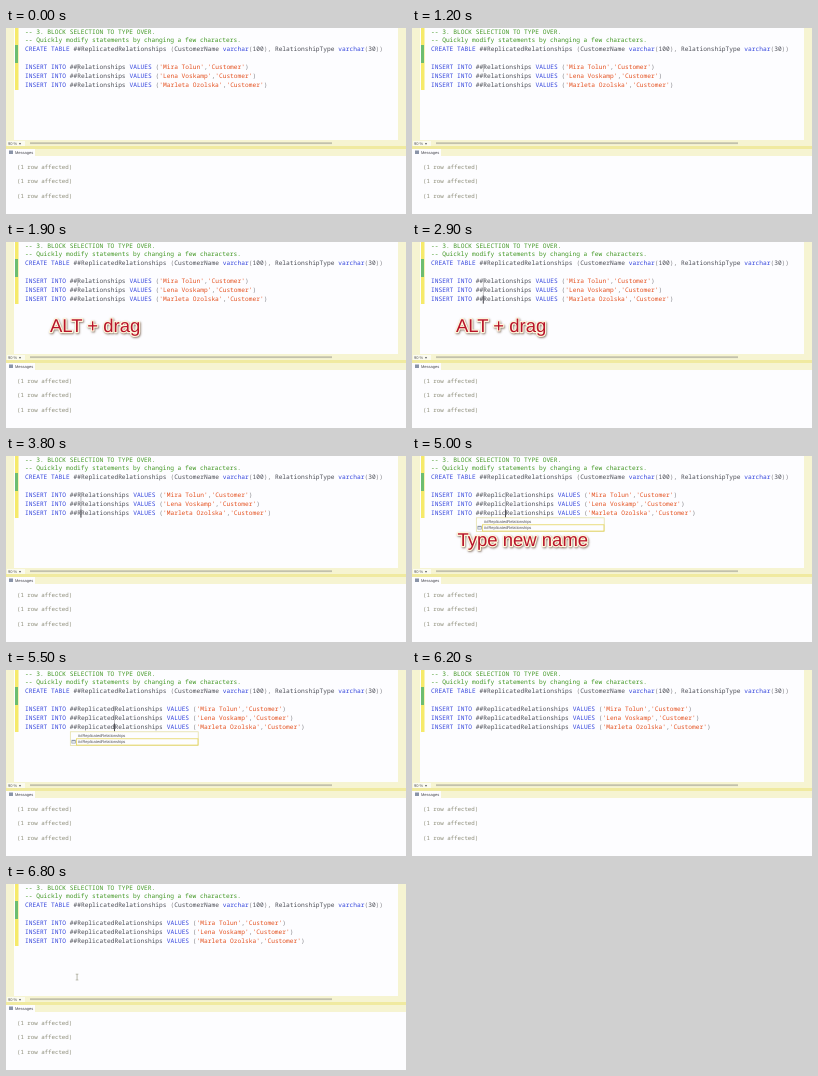
These frames come from a looping animation (400x186 px, 6900 ms). An HTML page with a canvas:

```html
<!DOCTYPE html>
<html lang="en">
<head>
<meta charset="utf-8">
<title>Block selection</title>
<style>
html, body { margin: 0; width: 100%; height: 100%; overflow: hidden; background: #fdfdff; }
canvas { display: block; width: 400px; height: 186px; }
</style>
</head>
<body>
<canvas id="stage"></canvas>
<script>
const W = 400, H = 186, LOOP = 6900;
const canvas = document.getElementById('stage');
const ratio = window.devicePixelRatio || 1;
canvas.width = W * ratio;
canvas.height = H * ratio;
const ctx = canvas.getContext('2d');
ctx.scale(ratio, ratio);
ctx.textRendering = 'geometricPrecision';

const MONO = '"Noto Sans Mono", "DejaVu Sans Mono", monospace';
const SANS = '"Liberation Sans", Arial, sans-serif';
const CELL = 3.73, LEFT = 19, LINE = 8.95;
const BLUE = '#3344dc', GREEN = '#3f9620', RED = '#e4501e', INK = '#4a4c55', GREY = '#85858a';
const PAPER = '#fdfdff', PANE = '#f6f4d2', EDGE = '#f0eaa0';

const people = ['Mira Tolun', 'Lena Voskamp', 'Marleta Ozolska'];
const typed = 'Replicated';
const keyTimes = [3600, 4300, 4400, 4500, 4900, 5000, 5100, 5200, 5300, 5400];
const suggestions = ['##RealRelationships', '##Relationships', 'Relationships',
  'db_accessadmin', 'db_backupoperator', 'db_datareader', 'db_datawriter',
  'db_ddladmin', 'db_denydatareader', 'db_denydatawriter'];
const matches = ['##ReplicatedRelationships', '##ReplicatedRelationships'];

const within = (t, a, b) => t >= a && t < b;
const ease = p => p * p * (3 - 2 * p);
const progress = (t, a, b) => ease(Math.min(1, Math.max(0, (t - a) / (b - a))));
const baseline = row => 5.5 + row * LINE;

function rect(x, y, w, h, color) {
  ctx.fillStyle = color;
  ctx.fillRect(x, y, w, h);
}

function label(text, x, y, size, color, family = SANS) {
  ctx.font = `${size}px ${family}`;
  ctx.fillStyle = color;
  ctx.fillText(text, x, y);
}

function code(row, parts) {
  let col = 0;
  for (const [text, color] of parts) {
    label(text, LEFT + col * CELL, baseline(row), CELL / 0.6, color, MONO);
    col += text.length;
  }
}

function drawPanes() {
  rect(0, 0, W, H, PAPER);
  rect(0, 0, 8, 112, PANE);
  rect(9, 0, 3.5, 62, '#f6ea6a');
  rect(9, 17, 3, 18, '#6cbd70');
  rect(392, 0, 8, 112, PANE);
  rect(0, 112, W, 16, PANE);
  rect(24, 114.3, 302, 1.8, '#c2c1ac');
  rect(0, 118, W, 3, EDGE);
  rect(1, 113, 18, 5, '#fbfbf0');
  label('90 %', 2, 117, 4, '#55555a');
  label('▾', 13, 117, 4, '#55555a');
  rect(0, 121, 29, 7, PAPER);
  rect(3, 122.5, 4, 3.5, '#8a94a8');
  label('Messages', 9, 126, 4, '#45454c');
  for (let i = 0; i < 3; i++)
    label('(1 row affected)', 11, 140.7 + i * 14.4, 5.75, '#8c8c78', MONO);
}

function drawCode(prefix) {
  code(0, [['-- 3. BLOCK SELECTION TO TYPE OVER.', GREEN]]);
  code(1, [['-- Quickly modify statements by changing a few characters.', GREEN]]);
  code(2, [['CREATE TABLE ', BLUE], ['##ReplicatedRelationships ', INK], ['(', GREY],
    ['CustomerName ', INK], ['varchar', BLUE], ['(', GREY], ['100', INK], ['), ', GREY],
    ['RelationshipType ', INK], ['varchar', BLUE], ['(', GREY], ['30', INK], ['))', GREY]]);
  people.forEach((name, i) => code(4 + i, [['INSERT INTO ', BLUE],
    [`##${prefix}Relationships `, INK], ['VALUES ', BLUE], ['(', GREY],
    [`'${name}'`, RED], [',', GREY], ["'Customer'", RED], [')', GREY]]));
}

function drawCaret(t, count) {
  if (t >= 5800) return;
  const x = LEFT + (14 + count) * CELL;
  const rows = 1 + Math.round(2 * progress(t, 2100, 2700));
  rect(x - 0.3, 36, 0.6, rows * LINE - 1, '#a0a0a4');
  if (rows === 3) rect(x - 0.4, 53.5, 0.8, 8, '#33333a');
}

function drawIcon(text, y) {
  if (!text.startsWith('db_')) {
    rect(65.5, y - 3.3, 4.2, 3.6, '#8c98a8');
    rect(66.2, y - 2, 2.8, 1.6, '#f2f4f6');
    return;
  }
  ctx.fillStyle = '#55504a';
  ctx.beginPath();
  ctx.arc(67.5, y - 2.5, 1.2, 0, 7);
  ctx.arc(67.5, y + 0.6, 2, Math.PI, 0);
  ctx.fill();
}

function drawPopup(t) {
  if (!within(t, 4300, 5800)) return;
  const short = t >= 5000;
  const items = short ? matches : suggestions;
  const step = 6.65, height = items.length * step + 1;
  rect(64, 61.5, 128.5, height, PAPER);
  ctx.strokeStyle = '#e2dc9c';
  ctx.lineWidth = 0.7;
  ctx.strokeRect(64.3, 61.8, 127.9, height - 0.6);
  if (!short) {
    rect(186.5, 62, 5.5, height - 1, PANE);
    rect(187.5, 68, 3.5, 8, '#cfcfbc');
  }
  ctx.strokeStyle = '#e3d04a';
  ctx.strokeRect(70.5, 68.8, short ? 121.5 : 115.5, step - 0.4);
  items.forEach((text, i) => {
    const y = 66.5 + i * step;
    if (i > 0) drawIcon(text, y);
    label(text, 72, y, 4, '#505056');
  });
}

function drawCaption(text, x) {
  ctx.save();
  ctx.font = `18.5px ${SANS}`;
  ctx.lineJoin = 'round';
  ctx.shadowColor = 'rgba(80, 50, 30, .6)';
  ctx.shadowBlur = 2 * ratio;
  ctx.shadowOffsetX = ctx.shadowOffsetY = 0.7 * ratio;
  ctx.strokeStyle = '#fff6dc';
  ctx.lineWidth = 2.4;
  ctx.strokeText(text, x, 90);
  ctx.shadowColor = 'transparent';
  ctx.fillStyle = '#b8142a';
  ctx.fillText(text, x, 90);
  ctx.restore();
}

function drawPointer(t) {
  if (t < 6300) return;
  const p = progress(t, 6300, 6700);
  const x = 108 - 37 * p, y = 66 + 27 * p;
  rect(x - 0.3, y - 3, 0.7, 6, '#9a9a84');
  rect(x - 1.3, y - 3.2, 2.7, 0.6, '#9a9a84');
  rect(x - 1.3, y + 2.7, 2.7, 0.6, '#9a9a84');
}

function draw(t) {
  const count = keyTimes.filter(k => t >= k).length;
  drawPanes();
  drawCode(typed.slice(0, count));
  drawCaret(t, count);
  drawPopup(t);
  if (within(t, 1600, 3100)) drawCaption('ALT + drag', 44);
  if (within(t, 4300, 5300)) drawCaption('Type new name', 45.5);
  drawPointer(t);
}

const start = performance.now();
function tick() {
  draw((performance.now() - start) % LOOP);
  requestAnimationFrame(tick);
}
tick();
</script>
</body>
</html>
```
